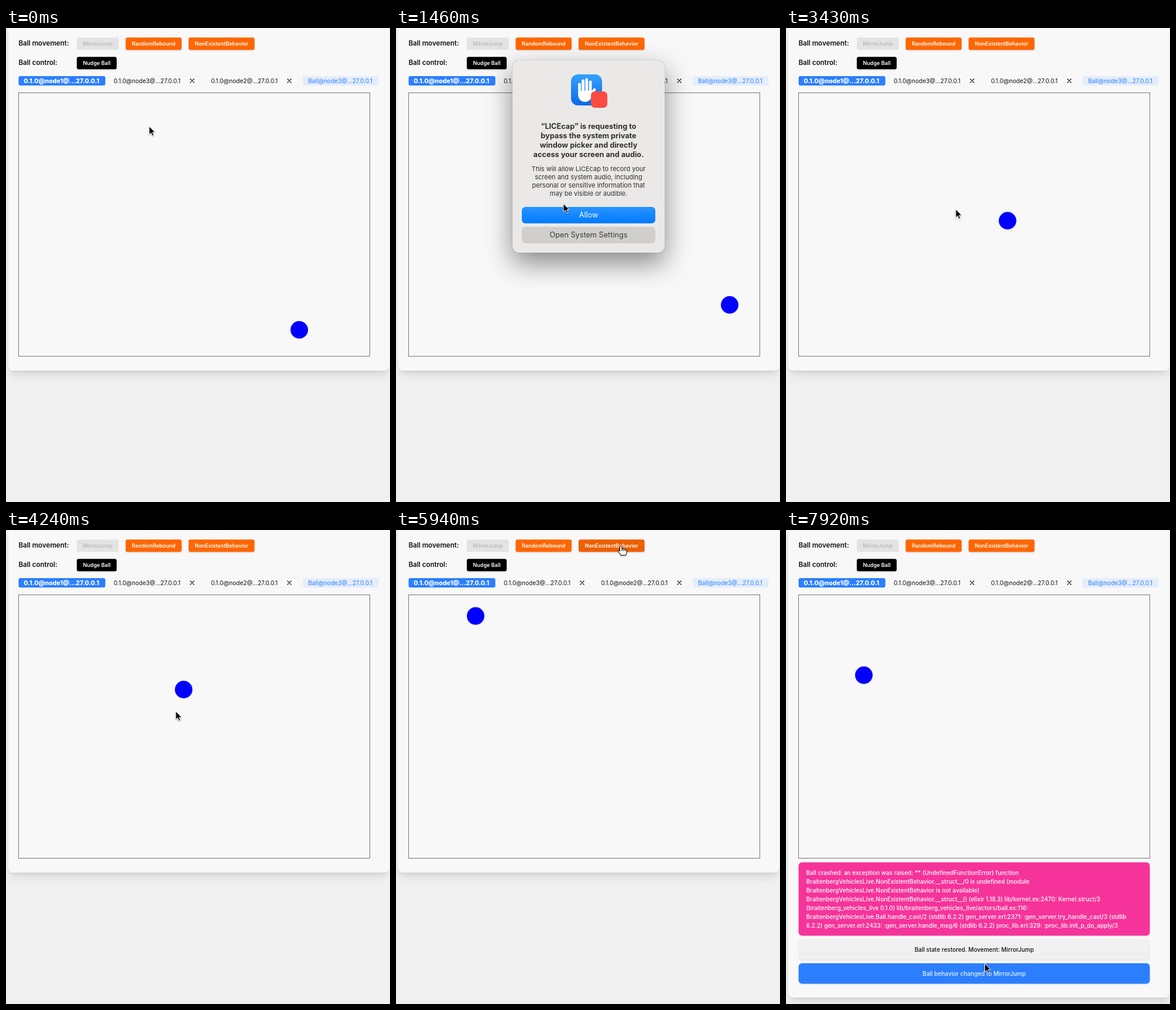
Animation of 656x808 px, one loop 8000 ms. Source, as an HTML page:

```html
<!DOCTYPE html>
<html lang="en">
<head>
<meta charset="utf-8">
<title>Ball demo</title>
<style>
html, body { margin: 0; width: 100%; height: 100%; overflow: hidden; background: #f0f0f0; }
#stage { position: relative; width: 656px; height: 808px; overflow: hidden; font: 10px/15px Inter, sans-serif; color: #111; }
#stage div { position: absolute; box-sizing: border-box; white-space: nowrap; }
#stage svg { position: absolute; left: 0; top: 0; overflow: visible; }

#panel { left: 4px; top: -12px; width: 651px; height: 596px; border-radius: 8px; background: #f8f8f8;
  box-shadow: 0 10px 15px -3px rgba(0,0,0,.1), 0 4px 6px -4px rgba(0,0,0,.1); }
.failed #panel { height: 809px; }

#bar { fill: #111; }
.label { font-size: 11.6px; font-weight: 600; }
.btn { fill: #ff6600; filter: drop-shadow(0 1px 1px rgba(0,0,0,.2)); }
.hover #missing { fill: #ee5f00; }
.black { fill: #000; }
.off { fill: #e3e3e3; filter: none; }
.caption { fill: #fff; font-size: 9px; font-weight: 600; text-anchor: middle; }
.faint { fill: #bababa; }
.chip { fill: #f9f9f9; stroke: #f3f3f3; }
.on { fill: #2b7fff; stroke: none; }
.link { fill: #e4edfd; stroke: none; }
.name { font-size: 10.1px; }
.strong { fill: #fff; font-size: 10.6px; font-weight: 800; }
.blue { fill: #2b7fff; }

#court { left: 21px; top: 110px; width: 601px; height: 450px; border: 1px solid #777; }
#ball { left: -15px; top: -15px; width: 30px; height: 30px; border-radius: 50%; background: #00f; }

#flash { visibility: hidden; left: 21px; top: 566px; width: 600px; transform: translate(.5px, .5px); font-weight: 500; }
.failed #flash { visibility: visible; }
#flash div { width: 600px; border-radius: 6px; text-align: center; height: 35px; line-height: 35px; box-shadow: 0 1px 2px rgba(0,0,0,.1); }
#flash .error { top: 0; height: 125px; padding: 10px 13px; line-height: 15px; text-align: left; background: #f6339a; color: #fff; }
#flash .info { top: 131px; background: #f0f0f0; font-weight: 500; }
#flash .done { top: 172px; background: #2b7fff; color: #eaf2ff; }

#alert { left: 199px; top: 55px; width: 260px; height: 328px; border-radius: 11px; background: #eae9e7; text-align: center;
  box-shadow: 0 0 1px rgba(0,0,0,.6), 0 18px 46px rgba(0,0,0,.46); }
#alert .title { top: 104.5px; width: 260px; font-size: 12.7px; font-weight: 700; line-height: 16px; color: #2f2f2e; }
#alert .body { top: 178px; width: 260px; font-size: 11px; line-height: 14px; color: #2f2f2e; }
#alert .choice { left: 16px; width: 228px; height: 28px; line-height: 28px; border-radius: 6px; font-size: 12.7px;
  background: #d0cfcd; color: #3a3a39; }
#alert .main { background: linear-gradient(#2a94ff, #007aff); color: #fff; }
#cursor { filter: drop-shadow(0 1px 1px rgba(0,0,0,.35)); }
#hand { display: none; }
.hover #hand { display: block; }
.hover #arrow { display: none; }
</style>
</head>
<body>
<div id="stage">
  <div id="panel"></div>
  <svg id="bar" width="656" height="110">
    <text class="label" x="21.4" y="29.8">Ball movement:</text>
    <text class="label" x="21.4" y="62.7">Ball control:</text>
    <rect class="btn off" x="121" y="16.2" width="71.6" height="21" rx="3"/>
    <rect class="btn" x="204.5" y="16.2" width="95.5" height="21" rx="3"/>
    <rect class="btn" id="missing" x="312" y="16.2" width="112.5" height="21" rx="3"/>
    <rect class="btn black" x="121" y="49.2" width="68" height="21" rx="3"/>
    <text class="caption faint" x="156.7" y="30.1">MirrorJump</text>
    <text class="caption" x="252.2" y="30.1">RandomRebound</text>
    <text class="caption" x="368.2" y="30.1">NonExistentBehavior</text>
    <text class="caption" x="155" y="63.1">Nudge Ball</text>
    <rect class="chip on" x="21.5" y="82" width="148.2" height="16" rx="3"/>
    <rect class="chip" x="175.5" y="82.2" width="160" height="15.600" rx="3"/>
    <rect class="chip" x="341.5" y="82.2" width="160" height="15.600" rx="3"/>
    <rect class="chip link" x="507" y="82" width="129.6" height="16" rx="3"/>
    <text class="name strong" x="30.3" y="93.8">0.1.0@node1@...27.0.0.1</text>
    <text class="name" x="184" y="93.700">0.1.0@node3@...27.0.0.1</text>
    <text class="name" x="350.2" y="93.700">0.1.0@node2@...27.0.0.1</text>
    <text class="name blue" x="516" y="93.700">Ball@node3@...27.0.0.1</text>
    <path stroke="#111" stroke-width="1.1" d="M314.5 86.500l7 7m0-7l-7 7M480.5 86.500l7 7m0-7l-7 7"/>
  </svg>
  <div id="court"></div>
  <div id="ball"></div>

  <div id="flash">
    <div class="error">Ball crashed: an exception was raised: ** (UndefinedFunctionError) function<br>
      BraitenbergVehiclesLive.NonExistentBehavior.__struct__/0 is undefined (module<br>
      BraitenbergVehiclesLive.NonExistentBehavior is not available)<br>
      BraitenbergVehiclesLive.NonExistentBehavior.__struct__() (elixir 1.18.3) lib/kernel.ex:2470: Kernel.struct/3<br>
      (braitenberg_vehicles_live 0.1.0) lib/braitenberg_vehicles_live/actors/ball.ex:116:<br>
      BraitenbergVehiclesLive.Ball.handle_cast/2 (stdlib 6.2.2) gen_server.erl:2371: :gen_server.try_handle_cast/3 (stdlib<br>
      6.2.2) gen_server.erl:2433: :gen_server.handle_msg/6 (stdlib 6.2.2) proc_lib.erl:329: :proc_lib.init_p_do_apply/3</div>
    <div class="info">Ball state restored. Movement: MirrorJump</div>
    <div class="done">Ball behavior changed to MirrorJump</div>
  </div>

  <div id="alert">
    <svg width="260" height="100">
      <defs><linearGradient id="sky" x2="0" y2="1"><stop stop-color="#35a2ff"/><stop offset="1" stop-color="#0a6ae6"/></linearGradient></defs>
      <rect x="100" y="24" width="53" height="53" rx="12" fill="url(#sky)"/>
      <g fill="none" stroke="#fff" stroke-width="4.8" stroke-linecap="round" stroke-linejoin="round">
        <path d="M114.5 56V41M120.5 53V35M126.7 53V33M133 54V37M133 61L140 50"/>
        <path fill="#fff" d="M114.5 55V60Q116 68.500 124 68.500Q131 68.500 134 60V54Z"/>
      </g>
      <rect x="134" y="53" width="28" height="28" rx="6.500" fill="#fb4b42"/>
    </svg>
    <div class="title">“LICEcap” is requesting to<br>bypass the system private<br>window picker and directly<br>access your screen and audio.</div>
    <div class="body">This will allow LICEcap to record your<br>screen and system audio, including<br>personal or sensitive information that<br>may be visible or audible.</div>
    <div class="choice main" style="top:250px">Allow</div>
    <div class="choice" style="top:284px">Open System Settings</div>
  </div>

  <svg id="cursor" width="20" height="24" stroke-linejoin="round">
    <path id="arrow" stroke="#fff" d="M.5 .5V14.800L3.800 11.700L6.100 16.900L8.500 15.800L6.300 10.800H10.700Z"/>
    <path id="hand" fill="#fff" stroke="#000" d="M-2 1.600a1.700 1.700 0 0 1 3.400 0V6a1.600 1.600 0 0 1 3 .3a1.600 1.600 0 0 1 2.800 .5a1.400 1.400 0 0 1 2.300 1.200v3.200c0 1.600-1.200 2.600-1.400 4.800H-.6c-.4-2.400-2.400-3.800-4.100-6.400c-.8-1.400 .8-2.400 2-1.200L-2 9.200ZM1.400 6v3M4.400 6.500v2.500M7.200 7v2"/>
  </svg>
</div>
<script>
const LOOP = 8000, STEP = 90;
const $ = id => document.getElementById(id);
const stage = $('stage'), ball = $('ball'), cursor = $('cursor'), alertBox = $('alert');

// Rows of time, x, y
const ballPath = [
  [30, 501, 514.5], [464, 540.5, 544], [920, 582, 513], [1130, 603, 497.2], [1460, 570, 472],
  [1810, 534, 445.2], [2620, 456, 386.5], [3430, 378.5, 328.5], [4240, 303.5, 272], [5050, 222, 211],
  [5230, 204.5, 198], [5940, 136, 146.6], [6230, 108.5, 126], [6480, 85, 144], [6930, 40, 177.8],
  [7560, 100, 222.5], [7920, 133, 247.5]
];
const cursorPath = [
  [840, 244, 167], [1460, 285.5, 299], [1640, 289.5, 308.5], [4380, 289.5, 308.5], [4780, 466, 110],
  [5050, 412, 39], [5230, 393.5, 19.5], [5340, 389, 13], [5590, 384.5, 27], [6820, 384.5, 27],
  [7560, 338, 724], [7740, 339, 738.5]
];

const clamp = v => Math.min(1, Math.max(0, v));
const ramp = (t, from, to) => clamp((t - from) / (to - from));
const linear = p => p;
const smooth = p => p * p * (3 - 2 * p);

function along(path, t, ease) {
  let i = 1;
  while (i < path.length - 1 && t > path[i][0]) i++;
  const a = path[i - 1], b = path[i], p = ease(ramp(t, a[0], b[0]));
  return [a[1] + (b[1] - a[1]) * p, a[2] + (b[2] - a[2]) * p];
}

function tick(t) {
  if (t < 120) return 0;
  const base = t < 920 ? 120 : t < 1810 ? 110 : t < 5940 ? 100 : 90;
  return base + STEP * Math.floor((t - base) / STEP + 1e-6);
}

function place(el, [x, y]) {
  el.style.transform = `translate(${x}px, ${y}px)`;
}

function draw(now) {
  const t = tick(now % LOOP);
  place(ball, along(ballPath, t, linear));
  place(cursor, along(cursorPath, t, smooth));
  const shown = smooth(ramp(t, 290, 560));
  alertBox.style.opacity = shown * (1 - ramp(t, 1600, 1800));
  alertBox.style.transform = `scale(${1.1 - 0.1 * shown})`;
  stage.classList.toggle('hover', t >= 5480 && t < 6920);
  stage.classList.toggle('failed', t >= 6200);
}

const start = performance.now();
function loop() {
  draw(performance.now() - start);
  requestAnimationFrame(loop);
}
loop();
</script>
</body>
</html>
```
